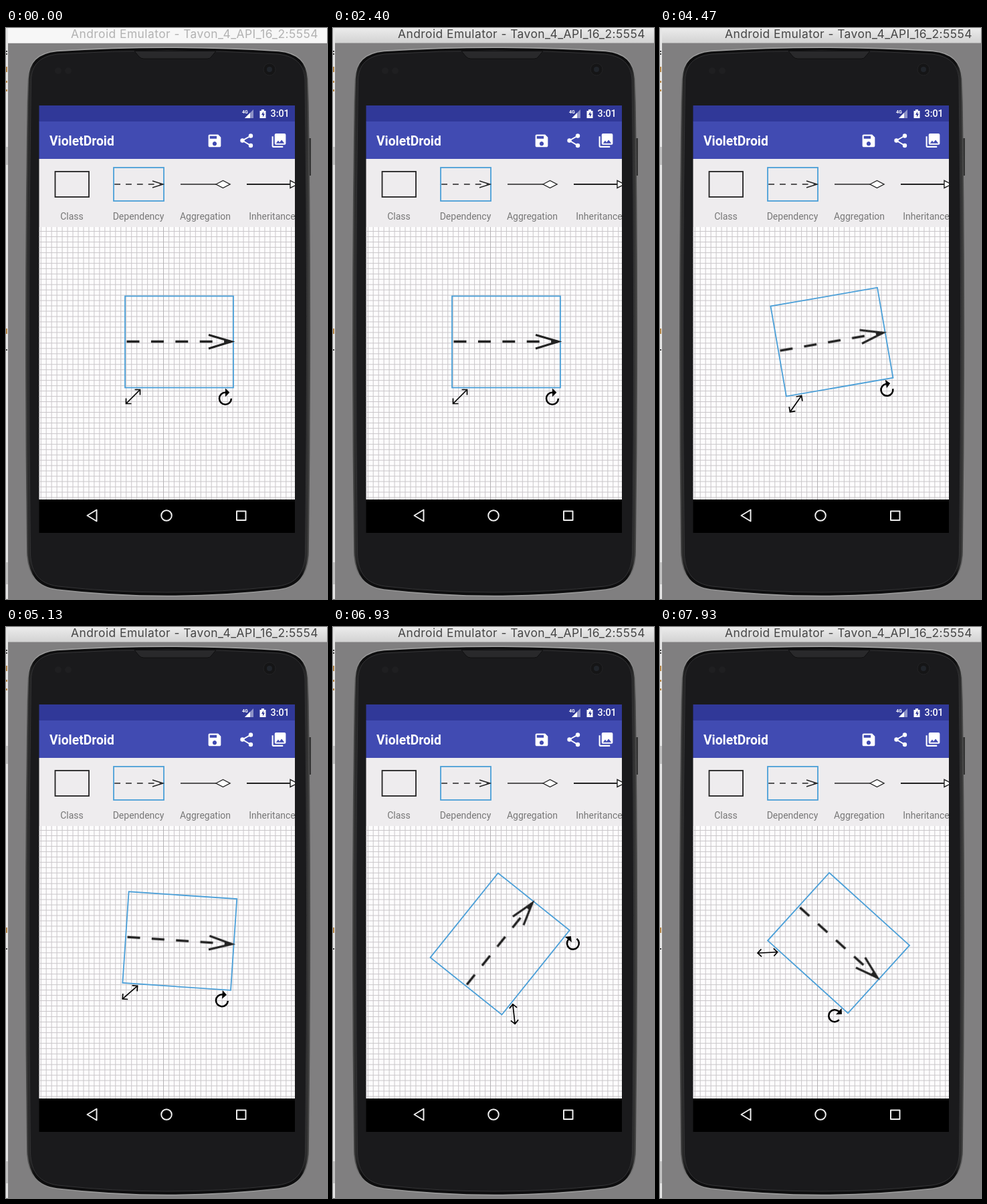
An HTML page that plays this animation: 480x855 px, repeating every 8000 ms.

```html
<!DOCTYPE html>
<html lang="en">
<head>
<meta charset="utf-8">
<title>Diagram editor</title>
<style>
  html, body { margin: 0; width: 100%; height: 100%; overflow: hidden; background: #807f80; }
  svg { display: block; width: 480px; height: 855px; }
  text { font-family: Roboto, sans-serif; }
  .caption { font-family: Inter, sans-serif; font-size: 17.4px; letter-spacing: .45px; }
  .label { font-size: 14px; fill: #777; text-anchor: middle; }
  .white { fill: #fff; }
  .line { fill: none; stroke: #222; }
  .pick { fill: none; stroke: #4a9fd8; }
</style>
</head>
<body>
<svg viewBox="0 0 480 855">
  <defs>
    <linearGradient id="bar" x2="0" y2="1"><stop stop-color="#ececec"/><stop offset="1" stop-color="#d2d2d2"/></linearGradient>
    <linearGradient id="rim" x2="1" y2="0">
      <stop stop-color="#3a3a3a"/><stop offset=".03" stop-color="#0e0e0f"/>
      <stop offset=".97" stop-color="#0e0e0f"/><stop offset="1" stop-color="#444"/>
    </linearGradient>
    <linearGradient id="edge" x2="0" y2="1">
      <stop stop-color="#a8a8a8"/><stop offset=".1" stop-color="#4c4c4c"/>
      <stop offset=".92" stop-color="#464646"/><stop offset="1" stop-color="#a0a0a0"/>
    </linearGradient>
    <clipPath id="screen"><rect x="49.5" y="116" width="382.5" height="640"/></clipPath>
    <filter id="soft" x="-10%" y="-50%" width="120%" height="200%"><feGaussianBlur stdDeviation=".6"/></filter>
  </defs>

  <rect width="480" height="855" fill="#807f80"/>
  <rect width="3" height="855" fill="#e6e6e6"/>
  <path d="M0 178h3v27h-3zM0 800h3v33h-3z" fill="#c2c2c2"/>
  <path d="M0 34h2v2h-2zM0 38h2v2h-2zM0 481h2v2h-2z" fill="#444"/>
  <path d="M0 58h2v8h-2zM0 79h2v3h-2zM0 92h2v3h-2zM0 450h2v8h-2z" fill="#b98a4a"/>
  <rect id="title" x="3" width="477" height="22.5"/>
  <path id="rule" d="M3 22.5H480"/>
  <text id="caption" class="caption" x="467" y="14.5" text-anchor="end">Android Emulator - Tavon_4_API_16_2:5554</text>

  <path d="M453 165h3v56h-3z" fill="#333"/>
  <path d="M33 76C34 51 47 37.500 76 34.500Q240 24 408 34.500C437 37.500 450 51 451.500 76Q457 430 452 790C450 820 438 837 408 841Q240 860 76 841C46 837 34 820 32 790Q27 430 33 76Z" fill="url(#rim)" stroke="url(#edge)" stroke-width="1.500"/>
  <path d="M37.500 78C38.500 55 50 42 78 39Q240 29 406 39C434 42 446 55 447 78Q452 430 447.500 788C446 816 435 832 406 836Q240 854 78 836C49 832 38 816 36.500 788Q32 430 37.500 78Z" fill="#1a1a1c" stroke="#343436"/>
  <path d="M192 34.500H314L307 43Q305 46 301 46H206Q202 46 199 43Z" fill="#29292b" stroke="#101011"/>
  <circle cx="394" cy="62" r="9" fill="#151516" stroke="#232325"/>
  <circle cx="394" cy="62" r="4" fill="#20242a"/>
  <g fill="#1f1f21"><circle cx="78" cy="64" r="5"/><circle cx="93" cy="64" r="5"/></g>

  <g clip-path="url(#screen)">
    <rect x="49" y="116" width="384" height="24.500" fill="#303898"/>
    <rect x="49" y="140" width="384" height="56" fill="#414bb2"/>
    <rect x="49" y="196" width="384" height="102" fill="#eeecee"/>
    <rect x="49" y="298" width="384" height="408" fill="#fdfcfd"/>
    <path id="grid" fill="none" stroke="#c9c6c9"/>
    <path d="M235.500 298V706" stroke="#b4b1b4"/>
    <rect x="49" y="706" width="384" height="50"/>

    <g class="white">
      <text x="353" y="128" font-size="7" font-weight="700">4G</text>
      <path d="M357 135L370 122V135Z" opacity=".45"/>
      <path d="M357 135L365 127V135Z"/>
      <path d="M379.500 124h2.500v-2h4v2h2.500v11h-9z"/>
      <path d="M385 125l-3 5h2v3.500l3-5h-2z" fill="#303898"/>
      <text x="395.500" y="133.300" font-size="14.300" font-weight="500">3:01</text>
      <text x="65" y="176" font-size="19.300" font-weight="700">VioletDroid</text>
      <path transform="translate(299.500 156.500) scale(1.04)" d="M17 3H5c-1.110 0-2 .9-2 2v14c0 1.100.89 2 2 2h14c1.100 0 2-.9 2-2V7l-4-4zm-5 16c-1.660 0-3-1.340-3-3s1.340-3 3-3 3 1.340 3 3-1.340 3-3 3zm3-10H5V5h10v4z"/>
      <path d="M366 161.500L353.500 168.500L366 176" fill="none" stroke="#fff" stroke-width="2"/>
      <circle cx="366" cy="161.500" r="3.200"/><circle cx="353.500" cy="168.500" r="3.200"/><circle cx="366" cy="176" r="3.200"/>
      <path transform="translate(395.500 156) scale(1.04)" d="M22 16V4c0-1.100-.9-2-2-2H8c-1.100 0-2 .9-2 2v12c0 1.100.9 2 2 2h12c1.100 0 2-.9 2-2zm-11-4l2.030 2.710L16 11l4 5H8l3-4zM2 6v14c0 1.100.9 2 2 2h14v-2H4V6H2z"/>
    </g>

    <rect class="line" x="73.500" y="215" width="50.500" height="38" stroke-width="1.800"/>
    <rect class="pick" x="161" y="209" width="75" height="50" stroke-width="1.800"/>
    <g class="line" stroke-width="1.400">
      <path d="M162.200 234H234" stroke-dasharray="8.800 8.050"/>
      <path d="M219 229L235 234L219 239"/>
      <path d="M261 234H314"/>
      <path d="M314 234L324.500 228.500L335 234L324.500 239.500Z" fill="#fff"/>
      <path d="M360 234H425" stroke-width="2"/>
      <path d="M425 228.500L436 234L425 239.500Z" fill="#fff"/>
    </g>
    <g class="label">
      <text x="98.500" y="287">Class</text>
      <text x="198" y="287">Dependency</text>
      <text x="298" y="287">Aggregation</text>
      <text x="398" y="287">Inheritance</text>
    </g>

    <g id="shape">
      <rect class="pick" x="178" y="401.500" width="162" height="137" stroke-width="1.800"/>
      <g class="line" stroke-width="3.600" filter="url(#soft)">
        <path d="M180.500 469.500H336" stroke-dasharray="19 17.400"/>
        <path d="M303 459.500L337 469.500L303 480" stroke-width="3.200"/>
      </g>
      <path class="line" d="M179 563L201 541M192.500 541.500H200.500V549.500M179.500 554.500V562.500H187.500" stroke-width="1.700" style="stroke:#000"/>
      <path transform="translate(312.600 538.100) scale(1.28)" d="M12 5V1l5 5-5 5V7a6 6 0 1 0 6 6h2a8 8 0 1 1-8-8z"/>
    </g>

    <g fill="none" stroke="#eee" stroke-width="2" stroke-linejoin="round">
      <path d="M121.500 730L135.500 721.500V738.500Z"/>
      <circle cx="240" cy="730" r="7.800"/>
      <rect x="345" y="723.500" width="13.500" height="13.500"/>
    </g>
  </g>
</svg>
<script>
  const LOOP = 8000, STEP = 1000 / 15, ACTIVE = 1270;
  const $ = id => document.getElementById(id);
  const set = (id, attrs) => {
    for (const key in attrs) $(id).setAttribute(key, attrs[key]);
  };

  // Turning points of the hand-driven swing: [ms, degrees]
  const swing = [[3570, 0], [4230, -46], [4793, 50], [5500, -48], [6070, 56], [6930, -51.3], [7933, 42.2]];

  function angle(t) {
    if (t <= swing[0][0]) return 0;
    const i = swing.findIndex(p => p[0] >= t);
    if (i < 0) return swing[swing.length - 1][1];
    const [t0, a0] = swing[i - 1], [t1, a1] = swing[i];
    const ease = (1 - Math.cos(Math.PI * (t - t0) / (t1 - t0))) / 2;
    return a0 + (a1 - a0) * ease;
  }

  function drawGrid() {
    const gap = 7.97;
    let d = '';
    for (let x = 52.2; x < 432; x += gap) d += `M${x.toFixed(2)} 298V706`;
    for (let y = 304.5; y < 706; y += gap) d += `M49 ${y.toFixed(2)}H433`;
    set('grid', { d });
  }

  function render(ms) {
    const t = Math.floor((ms % LOOP + 4) / STEP) * STEP;
    const active = t >= ACTIVE - 4;
    set('title', { fill: active ? 'url(#bar)' : '#f7f7f7' });
    set('rule', { stroke: active ? '#aaa' : '#ddd' });
    set('caption', { fill: active ? '#454545' : '#b2b2b2' });
    set('shape', { transform: `rotate(${angle(t).toFixed(2)} 259 482)` });
  }

  drawGrid();
  render(0);
  const start = performance.now();
  requestAnimationFrame(function tick() {
    render(performance.now() - start);
    requestAnimationFrame(tick);
  });
</script>
</body>
</html>
```
